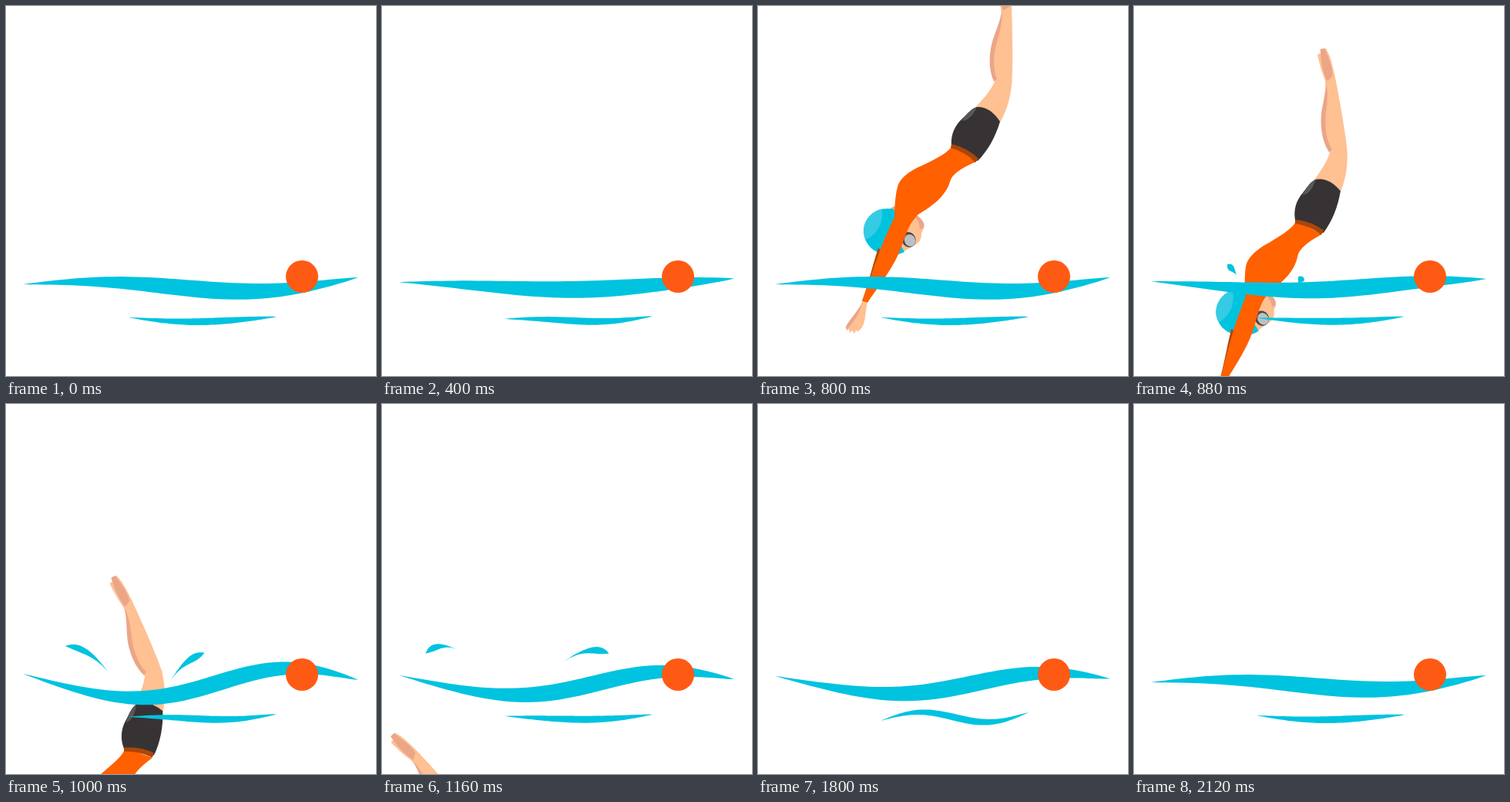
An HTML page for the animation above (2160 ms loop, 480x480 px).

```html
<!DOCTYPE html>
<html lang="en">
<head>
<meta charset="utf-8">
<title>Dive</title>
<style>
  html, body { margin: 0; width: 100%; height: 100%; overflow: hidden; background: #fff; }
  svg { display: block; width: 100vw; height: 100vh; }
  .water { fill: #00c3df; }
  .suit { fill: #ff6000; }
  .suit-dark { fill: #ab4609; }
  .skin { fill: #ffc092; }
  .skin-dark { fill: #eba587; }
  .shorts { fill: #373334; }
</style>
</head>
<body>
<svg viewBox="0 0 480 480">
  <g id="swimmer">
    <g id="lowerBody">
      <g id="shin">
        <path class="skin" d="M311-29Q315-34 318-24L328-4 316 8Q312-10 311-29Z"/>
        <path class="skin" d="M323-36C328-25 328-12 329 0 330 30 331 80 329 104L308 98C303 85 302 70 306 50 312 30 317 16 316 5 314-8 314-20 316-36Z"/>
        <path class="skin-dark" d="M316 4C316 18 307 34 303 50 299 68 300 85 306 98L310 95C305 82 305 66 309 50 314 34 318 18 316 4Z"/>
        <path class="skin-dark" d="M316-36L322-36C324-24 328-12 326 1L318 6C314-8 314-20 316-36Z"/>
      </g>
      <path class="skin" d="M308 96L329 102C327 125 320 140 314 151L281 133C292 120 301 112 308 96Z"/>
      <path class="shorts" d="M284 131Q301 130 314 150C308 170 298 188 285 201L251 182C250 170 253 159 262 149 270 142 275 134 284 131Z"/>
      <path fill="#5b5759" d="M284 131C275 134 270 142 264 149L270 148C277 144 281 138 284 131Z"/>
    </g>
    <path class="skin" d="M169 264L178 259 188 274 205 272Q218 279 215 288L212 295Q213 306 202 311L185 321 172 290Z"/>
    <path class="skin-dark" d="M169 264L177 260 181 272ZM203 273L207 272Q217 280 215 288L210 290Q210 280 203 273Z"/>
    <path class="water" d="M180 265C157 257 137 272 137 293 138 312 155 324 173 323Q183 323 190 319L180 300Z"/>
    <path fill="#35cbe5" d="M167 263C149 263 136 278 137 294Q138 300 140 303C155 296 163 281 161 263Z"/>
    <ellipse cx="195.500" cy="303" rx="9" ry="10" fill="#4b4548" transform="rotate(-25 196 303)"/>
    <ellipse cx="197" cy="304" rx="7" ry="8" fill="#bcc0c4" transform="rotate(-25 197 304)"/>
    <path class="suit" d="M252 181L283 202C262 211 251 219 249 228 243 248 225 260 207 271L190 292 177 280C177 262 178 245 181 235 184 222 200 212 215 206 235 196 247 190 252 181Z"/>
    <g id="arms">
      <path class="suit-dark" d="M156 314C149 335 144 358 135 383L142 384 166 322Z"/>
      <path class="suit" d="M179 270L207 271C196 280 190 303 183 320 172 345 155 365 142 385L135 383C146 355 154 320 179 270Z"/>
      <path class="skin" d="M136 383C130 396 120 405 114 416L115 421 118 419 119 424 122 421 125 425 127 421 130 422C141 414 138 400 142 385Z"/>
      <path class="skin-dark" d="M136 383C130 396 120 405 114 416L115 420C125 410 132 398 136 383Z"/>
    </g>
    <path id="belt" class="suit-dark" d="M251 179Q272 184 286 198L282 203Q268 189 250 184Z"/>
  </g>
  <path id="splashLeft" class="water"/>
  <path id="splashRight" class="water"/>
  <path id="bigWave" class="water"/>
  <path id="smallWave" class="water"/>
  <circle cx="384" cy="351" r="21" fill="#ff5a14"/>
</svg>
<script>
const LOOP = 2160, STEP = 40;
const { PI, sin } = Math;
const el = id => document.getElementById(id);
const setPath = (id, d) => el(id).setAttribute("d", d);
const mix = (a, b, k) => a + (b - a) * k;
const smooth = k => k * k * (3 - 2 * k);
const clamp = (v, lo = 0, hi = 1) => Math.min(hi, Math.max(lo, v));

// Eased value between neighbouring [time, value] keys.
function follow(keys, t) {
  const i = keys.findIndex(key => key[0] > t);
  if (i < 0) return keys[keys.length - 1][1];
  const [t0, a] = keys[i - 1], [t1, b] = keys[i];
  return mix(a, b, smooth((t - t0) / (t1 - t0)));
}

// Closed outline around sampled centre points with a half width across them.
function ribbon(sample, count = 48) {
  const one = [], other = [];
  for (let i = 0; i <= count; i++) {
    const { x, y, nx, ny, half } = sample(i / count);
    one.push([x + nx * half, y + ny * half]);
    other.unshift([x - nx * half, y - ny * half]);
  }
  return "M" + one.concat(other).map(p => p.map(v => v.toFixed(2))).join("L") + "Z";
}

// Sloped line bent by harmonics of a half sine.
function wave({ x0, x1, y0, y1, bends, thickness, skew }) {
  return ribbon(u => ({
    x: mix(x0, x1, u),
    y: bends.reduce((y, bend, i) => y + bend * sin(PI * (i + 1) * u), mix(y0, y1, u)),
    nx: 0, ny: 1,
    half: thickness / 2 * clamp(sin(PI * u ** skew)) ** 0.8
  }));
}

const swellKeys = [[0, 0], [520, 0.3], [800, 0], [1000, 1], [1400, 0.5], [1640, 1], [2120, 0]];
const curlKeys = [[0, 0], [520, 0.3], [800, 0], [1000, 0.25], [1400, -0.12], [1800, 1], [2120, 0]];

function drawWaves(t) {
  const swell = follow(swellKeys, t), curl = follow(curlKeys, t);
  setPath("bigWave", wave({
    x0: 22, x1: 457, y0: mix(361, 350, swell), y1: mix(352, 358, swell),
    bends: [mix(10, 14, swell), mix(-7.6, 19, swell), -4 * swell],
    thickness: 22, skew: 1.2
  }));
  setPath("smallWave", wave({
    x0: 159, x1: 351, y0: mix(404, 411, curl), y1: mix(403, 400, curl),
    bends: [mix(6, 1, curl), mix(0.5, -9, curl)],
    thickness: 9, skew: 1.1
  }));
}

function bezier(p, u) {
  const v = 1 - u;
  return [0, 1].map(n => v * v * v * p[0][n] + 3 * v * v * u * p[1][n]
    + 3 * v * u * u * p[2][n] + u * u * u * p[3][n]);
}

// Comet-like piece of an arc, cut off where it meets the water.
function splash(arc, tail, head, width, bias) {
  const from = clamp(tail), to = clamp(head);
  if (to - from < 0.005) return "";
  return ribbon(k => {
    const u = mix(from, to, k);
    const [x, y] = bezier(arc, u);
    const p = bezier(arc, u - 0.01), q = bezier(arc, u + 0.01);
    const dx = q[0] - p[0], dy = q[1] - p[1], length = Math.hypot(dx, dy);
    const along = clamp((u - tail) / (head - tail));
    return { x, y, nx: -dy / length, ny: dx / length, half: width / 2 * sin(PI * along ** bias) };
  }, 24);
}

const leftArc = [[134, 350], [105, 309], [52, 293], [43, 358]];
const rightArc = [[212, 364], [226, 325], [300, 293], [313, 352]];

function drawSplashes(t) {
  const rise = clamp((t - 840) / 160), fall = (t - 1000) / 400, gone = Math.max(0, fall);
  setPath("splashLeft", splash(leftArc, 0.91 * gone, 0.54 * (rise + gone), 8, 1.8));
  setPath("splashRight", splash(rightArc, 0.58 * gone, 0.46 * rise + 0.74 * gone, 9, 2.6));
}

function turn(id, angle, x, y) {
  el(id).setAttribute("transform", `rotate(${angle} ${x} ${y})`);
}

function drawSwimmer(t) {
  const s = t - 800, c = clamp(s, -160, 200);
  // Ballistic fall, steady speed above the stage and under water.
  const speed = s > 200 ? 1.15 : 0.837;
  const x = -0.5236 * s + 0.000243 * s * s;
  const y = 1.125 * c + 0.0009 * c * c + speed * (s - c);
  el("swimmer").style.display = t > 300 && t < 1320 ? "" : "none";
  el("swimmer").setAttribute("transform", `translate(${x} ${y}) rotate(${-0.067 * s} 267 192)`);
  turn("lowerBody", -0.025 * s, 267, 192);
  turn("belt", -0.025 * s, 267, 192);
  turn("shin", -0.023 * s, 318, 98);
  turn("arms", 0.018 * s, 190, 270);
}

function draw(t) {
  drawSwimmer(t);
  drawSplashes(t);
  drawWaves(t);
}

const start = performance.now();
function tick() {
  const t = Math.max(0, performance.now() - start) % LOOP;
  draw(Math.floor(t / STEP) * STEP);
  requestAnimationFrame(tick);
}
tick();
</script>
</body>
</html>
```
